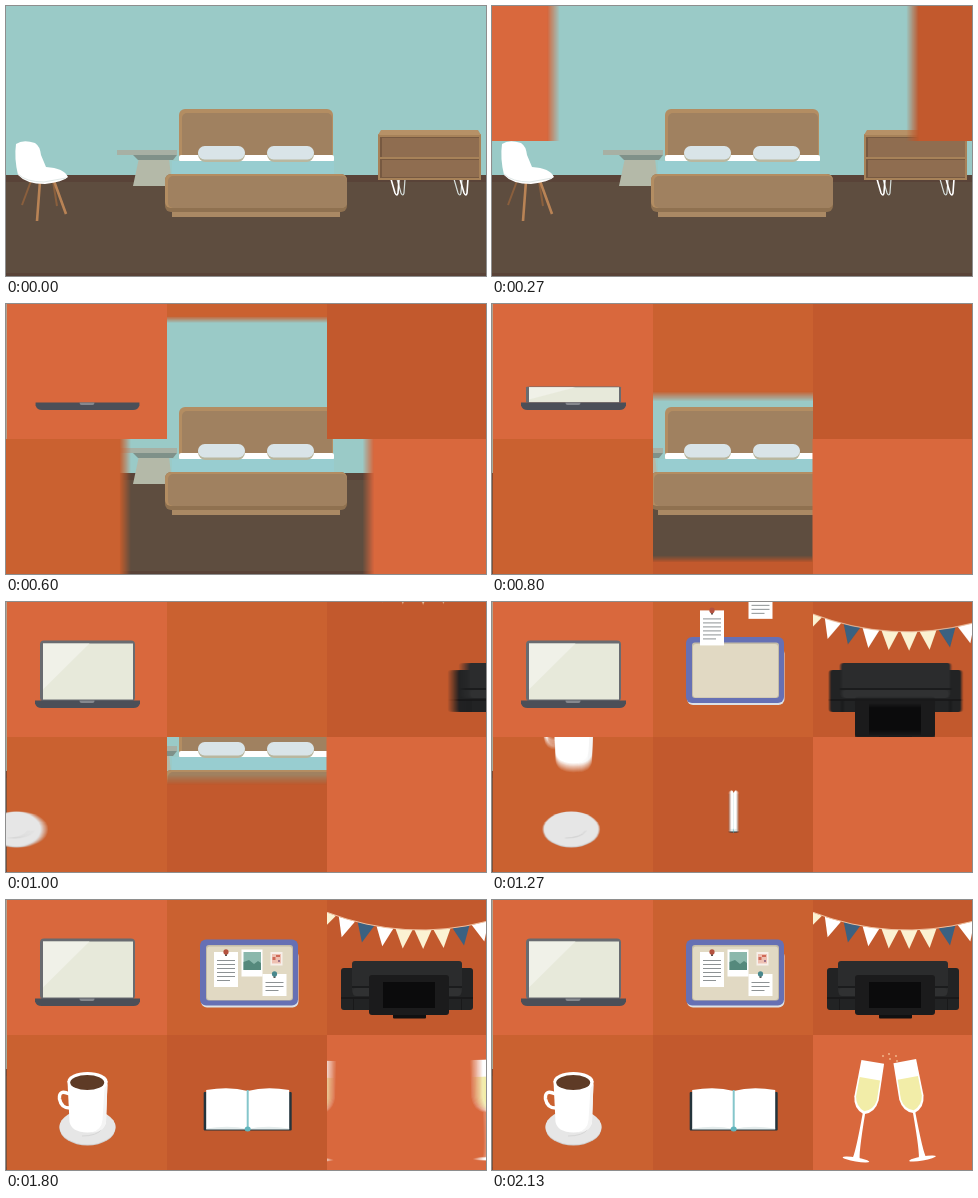
Animation, 480 px wide and 270 px high, one loop 2.19 s. Source, as an HTML page with a canvas:

```html
<!DOCTYPE html>
<html lang="en">
<head>
<meta charset="utf-8">
<title>Room to tiles</title>
<style>
html, body { margin: 0; width: 100%; height: 100%; overflow: hidden; background: #9acac7; }
canvas { display: block; width: 480px; height: 270px; }
</style>
</head>
<body>
<canvas id="stage" width="480" height="270"></canvas>
<script>
const LOOP = 2190, STEP = 200 / 3, LAST = 32, SHUTTER = 26, SAMPLES = 10;
const W = 480, H = 270;
const RUST = '#d9683d', AMBER = '#ca6130', BRICK = '#c2592d';
const out = document.getElementById('stage').getContext('2d');
const layer = document.createElement('canvas');
layer.width = W;
layer.height = H;
const c = layer.getContext('2d');

// Progress from 0 to 1 with a sine ease in and out
function ease(t, start, length) {
  const p = Math.min(1, Math.max(0, (t - start) / length));
  return (1 - Math.cos(Math.PI * p)) / 2;
}

function rect(color, x, y, w, h, r = 0) {
  c.fillStyle = color;
  c.beginPath();
  c.roundRect(x, y, w, h, r);
  c.fill();
}

function oval(color, x, y, rx, ry = rx) {
  c.fillStyle = color;
  c.beginPath();
  c.ellipse(x, y, rx, ry, 0, 0, 7);
  c.fill();
}

function shape(color, d) {
  c.fillStyle = color;
  c.fill(new Path2D(d));
}

function line(color, width, d) {
  c.strokeStyle = color;
  c.lineWidth = width;
  c.stroke(new Path2D(d));
}

function at(x, y, draw, angle = 0) {
  c.save();
  c.translate(x, y);
  c.rotate(angle);
  draw();
  c.restore();
}

// Draw inside a fixed cell
function cell(x, y, w, h, draw) {
  c.save();
  c.beginPath();
  c.rect(x, y, w, h);
  c.clip();
  draw();
  c.restore();
}

function room() {
  rect('#9acac7', 0, 0, W, 169);
  rect('#5e4d3f', 0, 169, W, 101);
  rect('#594338', 0, 169, W, 7);
  rect('#594338', 0, 267, W, 3);
  chair();
  sideTable();
  bed();
  dresser();
}

function chair() {
  line('#8a5f3d', 2, 'M25 175L16 199M47 175L51 200');
  line('#b98355', 2.6, 'M34 175L31 215M48 175L60 208');
  shape('#fff', 'M10 138Q17 133 29 137Q34 140 35 149L40 161Q58 162 62 171Q57 176 39 178Q20 178 12 169Q8 152 10 138Z');
  line('#dfe7e6', 1, 'M12 168Q20 176 38 176L60 172');
}

function sideTable() {
  shape('#b4b9a8', 'M133 152H163L166 180H127Z');
  shape('#7f9189', 'M127 149H171L167 154H132Z');
  rect('#a7b0a4', 111, 144, 60, 5);
}

function bed() {
  rect('#b38d62', 173, 103, 154, 52, [6, 6, 0, 0]);
  rect('#a08160', 176, 107, 150, 48, [5, 5, 0, 0]);
  rect('#fff', 173, 149, 155, 7, 2);
  rect('#98cdd0', 166, 155, 162, 14);
  for (const x of [192, 261]) {
    rect('#b9b79f', x, 141, 47, 15, 8);
    rect('#d9e4e8', x, 140, 47, 13.5, 7);
  }
  rect('#aa8964', 166, 203, 168, 8);
  rect('#8f7150', 159, 168, 182, 38, 6);
  rect('#b38d62', 159, 168, 182, 34, 6);
  rect('#a08160', 162, 170, 179, 32, 5);
}

function dresser() {
  const leg = x => `M${x} 173L${x + 4} 187Q${x + 6} 191 ${x + 7} 187L${x + 8} 173`;
  line('#d5dedb', 1.2, leg(391) + leg(448));
  line('#fff', 1.6, leg(385) + leg(454));
  rect('#a78259', 372, 128, 103, 46);
  shape('#b69167', 'M375 124H472L475 129H372Z');
  rect('#775941', 374, 131, 99, 41);
  rect('#8f6d50', 376, 132, 97, 19);
  rect('#8f6d50', 376, 154, 97, 17);
  rect('#a78259', 374, 151, 99, 2);
}

function panels(t) {
  const top = 161 * ease(t, 55, 500), low = 161 * ease(t, 270, 500);
  if (top) {
    rect(RUST, top - 160.4, 0, 160.4, 135);
    rect(BRICK, 482 - top, 0, 160, 135);
  }
  if (low) {
    rect(AMBER, low - 160.3, 135, 160.3, 135);
    rect(RUST, 481.5 - low, 135, 160, 135);
  }
  rect(AMBER, 161, 135 * ease(t, 490, 500) - 135, 160, 135);
  rect(BRICK, 161, H - 135 * ease(t, 693, 497), 160, 135);
}

function laptop(t) {
  const wide = ease(t, 320, 300), tall = ease(t, 710, 260);
  at(81.5, 98.5, () => {
    if (tall) {
      c.save();
      c.scale(1, tall);
      rect('#696b70', -47.5, -60, 95, 61, 4);
      rect('#e7e9da', -44.5, -57, 90, 56);
      shape('#f0f1e8', 'M-44.5 -57H2L-44.5 -11Z');
      c.restore();
    }
    c.scale(wide, 1);
    shape('#4b4f58', 'M-52.5 0H52.5V3Q51 7.5 46 7.5H-46Q-51 7.5 -52.5 3Z');
    rect('#85888e', -8, 0, 15, 2.5, [0, 0, 2, 2]);
  });
}

function pin(color, x, y) {
  rect('#5a5550', x - 1, y, 2, 4);
  oval(color, x, y, 2.6, 2.8);
}

function note(x, y, w, h, rows, color) {
  rect('#fff', x, y, w, h);
  for (let i = 0; i < rows; i++) rect('#8d9294', x + 3, y + 8 + i * 4, w - (i == rows - 1 ? 11 : 6), 1);
  pin(color, x + w / 2, y);
}

function board(t) {
  const drop = (far, start, length, draw) =>
    at(0, -far * (1 - ease(t, start, length)), draw);
  drop(110, 990, 318, () => {
    rect('#dce1e6', 195, 50, 97.5, 57.5, 6);
    rect('#6670b4', 194, 39.5, 98, 66, 6);
    rect('#c4bca8', 200, 45, 87, 55.5, 3);
    rect('#e1d9c3', 201, 46.5, 85, 53.5, 3);
  });
  drop(92, 1060, 400, () => note(208, 52, 24, 35, 6, '#b4523f'));
  drop(80, 1250, 270, () => {
    rect('#fff', 235.5, 49.5, 21, 27);
    rect('#8bb8ac', 237.5, 52, 17.5, 18);
    shape('#55897c', 'M237.500 62L243 60L248 64L252 61L255 63V70H237.500Z');
  });
  drop(100, 1158, 360, () => note(256.5, 74, 24, 22, 3, '#49888d'));
  drop(69, 1282, 360, () => {
    rect('#f7efe9', 264.5, 52, 12, 13.5);
    rect('#eec0b2', 266, 54, 9, 9.5);
    rect('#cf6a59', 266.5, 57, 3, 3);
    rect('#cf6a59', 270, 55, 4, 2);
    rect('#9c7288', 272, 60, 2, 2);
  });
}

function bunting(t) {
  const cream = '#fbf2d2', blue = '#3b6181', white = '#fff';
  const low = 415, bend = 0.002;
  at(0, -52 * (1 - ease(t, 930, 350)), () => {
    [cream, white, blue, white, cream, cream, cream, blue, white].forEach((color, i) => {
      const d = 322 + i * 19 - low;
      at(low + d, 30 - bend * d * d, () => shape(color, 'M-8.5 0H8.5L0 19Z'), Math.atan(-2 * bend * d));
    });
    line('#f0c0a0', 1, 'M320 12Q400 42.4 480 21.5');
  });
}

function sofa(t) {
  at(155 * (1 - ease(t, 835, 470)), 0, () => {
    rect('#222324', 335, 68, 132, 42, 3);
    rect('#2b2c2d', 346, 61, 110, 33, 3);
    rect('#1b1c1d', 346, 86, 110, 2);
    rect('#303132', 347, 88, 108, 8, 3);
    rect('#19191a', 335, 97, 132, 2);
    rect('#19191a', 347, 98, 1, 12);
    rect('#19191a', 455, 98, 1, 12);
  });
  at(0, 62 * (1 - ease(t, 1030, 400)), () => {
    rect('#101011', 387, 114, 33, 4.5, 1);
    rect('#1b1b1c', 363, 75, 80, 40, 3);
    rect('#0b0b0c', 377, 82, 52, 26);
  });
}

function coffee(t) {
  at(-111.5 * (1 - ease(t, 780, 535)), 0, () => {
    oval('#cfcfcf', 81.5, 228, 28, 17.5);
    oval('#e6e6e6', 81.5, 227, 28, 17.5);
    line('#d6d6d6', 1, 'M76 236Q91 236 96 229');
  });
  at(-0.5, -100 * (1 - ease(t, 1110, 400)), () => {
    line('#fff', 3.5, 'M64 194Q53 189 54 199Q56 209 66 208');
    shape('#fff', 'M62 181H102L100.5 222Q99 232 82 232.500Q66 232 64 222Z');
    shape('#f4f4f4', 'M102 184L100.5 222Q99 232 86 232.500Q96 230 97 220L99 188Z');
    oval('#fff', 82, 181.5, 20, 9.5);
    oval('#5e3b26', 81.7, 182.5, 17, 7.5);
  });
}

function book(t) {
  const open = ease(t, 1200, 340);
  if (!open) return;
  at(241.7, 0, () => {
    c.scale(open, 1);
    rect('#24343c', -44, 192, 88, 38.5, 1);
    shape('#fff', 'M-41.500 190Q-18 186 0 191Q18 186 41.500 190V229H-41.500Z');
    shape('#e4ecec', 'M-41.500 228.500Q-18 225 0 229Q18 225 41.500 228.500V229.500H-41.500Z');
    rect('#85c6cb', -1, 190, 2, 39);
    oval('#62b5bd', 0, 229, 3, 2.5);
  });
}

function glass(x, y, angle) {
  at(x, y, () => {
    oval('#fff', 0, 0, 13.5, 2);
    shape('#fff', 'M-4 0Q-1.500 -4 -1.200 -48H1.200Q1.500 -4 4 0Z');
    shape('#fff', 'M-11.500 -99H11.500L12.300 -62Q11 -49 0 -46Q-11 -49 -12.300 -62Z');
    shape('#f2eda8', 'M-10.300 -82H10.300L10.600 -62Q9 -52 0 -49Q-9 -52 -10.600 -62Z');
  }, angle);
}

function toast(t) {
  const away = 110 * (1 - ease(t, 1600, 400)), tilt = ease(t, 1700, 330);
  glass(364 - away, 259.5, 0.17 * tilt);
  glass(430.5 + away, 258.5, -0.18 * tilt);
  const pop = ease(t, 1960, 160);
  if (!pop) return;
  for (const [x, y] of [[-7, -6], [-1, -8], [6, -6], [0, -3], [7, -1]])
    oval('#f4bd91', 398 + x * pop, 162 + y * pop, 0.9);
}

// The laptop and the board stay crisp, so they use the frame's own time
function scene(t, crisp) {
  room();
  panels(t);
  cell(0, 0, 161, 135, () => laptop(crisp));
  cell(161, 0, 160, 135, () => board(crisp));
  cell(321, 0, 159, 135, () => { bunting(t); sofa(t); });
  cell(0, 135, 161, 135, () => coffee(t));
  cell(161, 135, 160, 135, () => book(t));
  cell(321, 135, 159, 135, () => toast(t));
}

// Average several moments to get motion blur
function render(t) {
  for (let k = 0; k < SAMPLES; k++) {
    scene(t + SHUTTER * ((k + 0.5) / SAMPLES - 0.5), t);
    out.globalAlpha = 1 / (k + 1);
    out.drawImage(layer, 0, 0);
  }
}

const begin = performance.now();
let shown = -1;
function tick() {
  const time = (performance.now() - begin) % LOOP;
  const step = Math.min(LAST, Math.floor((time + 4) / STEP));
  if (step !== shown) render(step * STEP);
  shown = step;
  requestAnimationFrame(tick);
}
tick();
</script>
</body>
</html>
```
